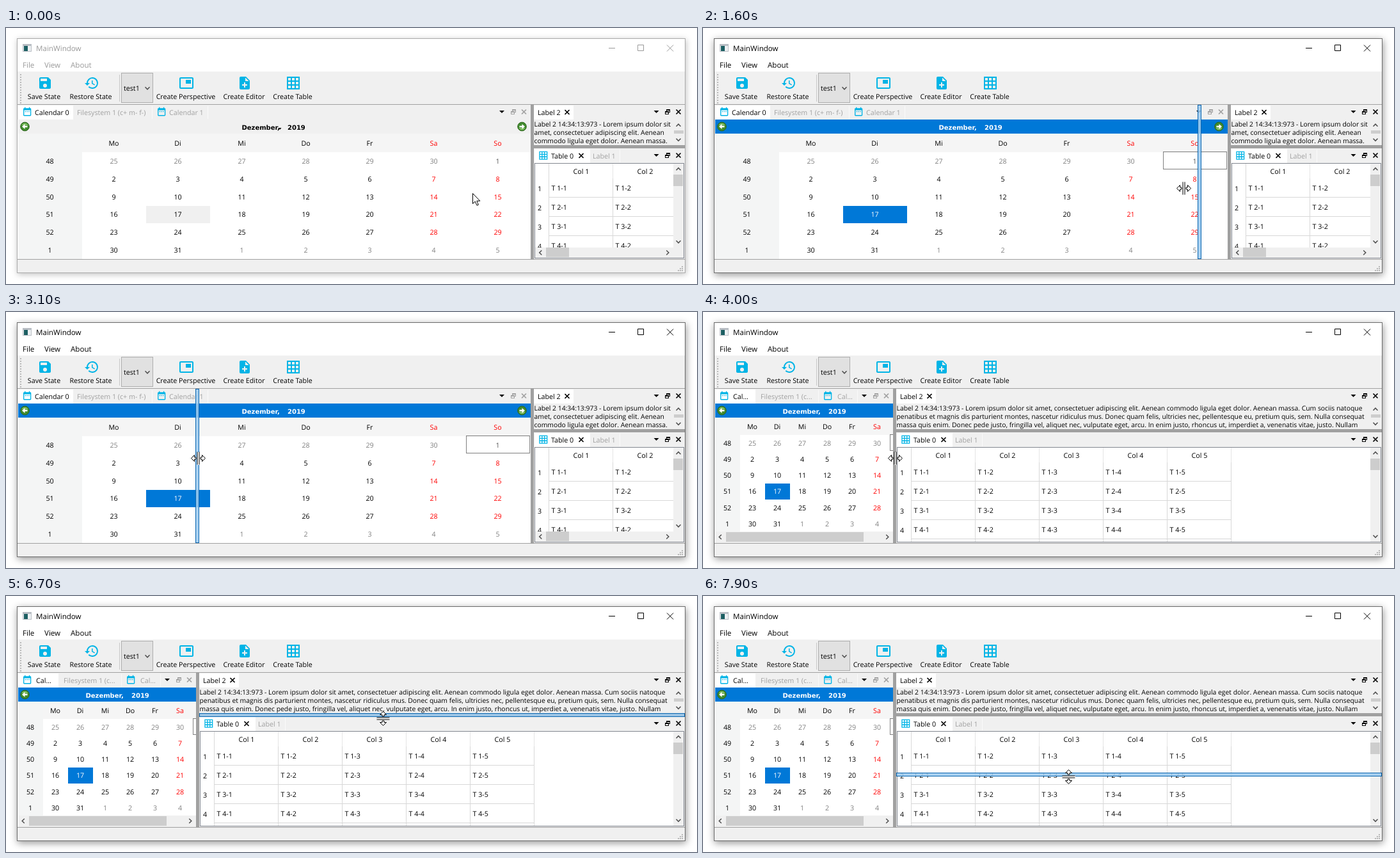
Animation, 1080 px wide and 400 px high, one loop 8000 ms. Source, as an HTML page:

```html
<!DOCTYPE html>
<html lang="en">
<head>
<meta charset="utf-8">
<title>MainWindow</title>
<style>
html, body { margin: 0; width: 100%; height: 100%; overflow: hidden; background: #fff; }
svg { display: block; }
#stage {
  --sel: #0078d7; --selText: #fff; --ui: #000; --edge: #6b6b6b;
  --shadow: drop-shadow(1px 3px 6px rgba(0,0,0,.42));
}
#stage.off {
  --sel: #f0f0f0; --selText: #000; --ui: #999; --edge: #aaa;
  --shadow: drop-shadow(1px 2px 5px rgba(0,0,0,.25));
}
text { font: 10.7px "Open Sans", "Noto Sans", sans-serif; text-rendering: geometricPrecision; white-space: pre; }
.ui { font-size: 11.6px; fill: var(--ui); }
.body { font-size: 10.36px; }
.bold { font: bold 10px "DejaVu Sans", sans-serif; fill: var(--selText); }
.mid { text-anchor: middle; }
.dim { fill: #a0a0a0; }
rect, .crisp { shape-rendering: crispEdges; }
.frame { filter: var(--shadow); }
.line { fill: none; stroke: #505050; stroke-width: 1.5; }
.icon { fill: #00b4e6; }
.grid { fill: none; stroke: #00b4e6; stroke-width: 2; }
.focus { fill: none; stroke: #000; stroke-dasharray: 1 1; shape-rendering: auto; }
.off .focus, #stage:not(.off) .hint { display: none; }
.bar { fill: #9ccbef; fill-opacity: .88; stroke: #0b66b0; }
.cursor { fill: #fff; stroke: #000; }
</style>
</head>
<body>
<svg id="stage" width="1080" height="400" viewBox="0 0 1080 400"></svg>
<script>
const rect = (x, y, w, h, fill, more = '') =>
  `<rect x="${x}" y="${y}" width="${w}" height="${h}" fill="${fill}" ${more}/>`;
const text = (x, y, s, cls = '', fill = '') =>
  `<text x="${x}" y="${Math.round(y)}" class="${cls}" ${fill && `style="fill:${fill}"`}>${s}</text>`;
const path = (d, attrs) => `<path d="${d}" ${attrs}/>`;
const at = (x, y, body, more = '') => `<g transform="translate(${x} ${y}) ${more}">${body}</g>`;
const clip = (x, y, w, h, body) =>
  `<svg x="${x}" y="${y}" width="${w}" height="${h}" viewBox="${x} ${y} ${w} ${h}">${body}</svg>`;
const range = (n, fn) => Array.from({ length: n }, (_, i) => fn(i)).join('');

const GREY = '#a0a0a0', PANEL = '#f0f0f0', LINE = '#d8d8d8', THUMB = '#cdcdcd';

const glyph = {
  save: 'M17 3H5c-1.1 0-2 .9-2 2v14c0 1.1.9 2 2 2h14c1.1 0 2-.9 2-2V7zm-5 16a3 3 0 1 1 0-6a3 3 0 1 1 0 6zm3-10H5V5h10z',
  restore: 'M13 3a9 9 0 0 0-9 9H1l4 4 4-4H6a7 7 0 1 1 2 5l-1.4 1.4A9 9 0 1 0 13 3zm-1 5v5l4.3 2.5.7-1.2-3.5-2V8z',
  perspective: 'M19 7h-8v6h8zm2-4H3c-1.1 0-2 .9-2 2v14c0 1.1.9 2 2 2h18c1.1 0 2-.9 2-2V5c0-1.1-.9-2-2-2zm0 16H3V5h18z',
  editor: 'M14 2H6c-1.1 0-2 .9-2 2v16c0 1.1.9 2 2 2h12c1.1 0 2-.9 2-2V8zm2 14h-3v3h-2v-3H8v-2h3v-3h2v3h3zm-3-7V3.5L18.5 9z',
  calendar: 'M19 4h-1V2h-2v2H8V2H6v2H5c-1.1 0-2 .9-2 2v14c0 1.1.9 2 2 2h14c1.1 0 2-.9 2-2V6c0-1.1-.9-2-2-2zm0 16H5V9h14zM7 11h2v2H7zm4 0h2v2h-2zm4 0h2v2h-2z'
};
const icon = (name, x, y, scale = 1) =>
  at(x, y, path(glyph[name], 'class="icon" fill-rule="evenodd"'), `scale(${scale})`);
const gridIcon = (x, y, scale = 1) => at(x, y,
  path([3, 9, 15, 21].map(p => `M${p} 2v20M2 ${p}h20`).join(''), 'class="grid"'), `scale(${scale})`);

const chevron = (x, y, turn = 0) =>
  at(x, y, path('M-3.5 -1.8L0 1.8L3.5 -1.8', 'class="line"'), `rotate(${turn})`);
const cross = (x, y, color = '#000') =>
  at(x, y, path('M-3.5 -3.5l7 7m0 -7l-7 7', `stroke="${color}" stroke-width="1.7"`));

function dockButtons(x, y, color) {
  return path(`M${x - 4} ${y - 2}h8l-4 4z`, '') +
    at(Math.round(x + 17.5), y, path('M-3.5 -.5h5v4h-5zM-1.5 -.5v-3h5v4h-2M-3.5 .5h5M-1.5 -2.5h5',
      `fill="none" stroke="${color}" class="crisp"`)) +
    cross(x + 34.5, y, color);
}

function roundArrow(x, turn) {
  return at(x, 154,
    '<circle r="6.8" fill="#3f8a2c" stroke="#2c641d"/><path d="M-5 -2a5.4 5.4 0 0 1 10 0z" fill="#7fbd62"/>' +
    path('M4 -1.2H0V-4L-4.5 0L0 4V1.2H4z', 'fill="#fff"'), `rotate(${turn})`);
}

function calendar(wide) {
  const right = wide ? 820 : 297, bottom = wide ? 361 : 343;
  const w = wide ? 100 : 39, h = wide ? 27.8 : 25.3, top = wide ? 166.4 : 166.8;
  const x0 = 19, mid = x0 + w * 4 - .5;
  const cx = c => x0 + w * (c + .5) - .5, cy = r => top + h * (r + .5) + 3.8;
  let s = rect(19, 143, right - 19, 218, '#fff') +
    rect(19, 165, right - 19, h + top - 165, '#f5f5f5') + rect(19, 165, w, bottom - 165, '#f4f5f5') +
    rect(19, 143, right - 19, 22, 'var(--sel)') +
    text(mid - 50, 159, 'Dezember,', 'bold') + text(mid + 21.5, 159, '2019', 'bold') +
    path(`M${mid + 7} 156h5l-2.5 3z`, 'class="hint"') +
    roundArrow(29.5, 0) + (wide ? roundArrow(806.5, 180) : '');
  ['Mo', 'Di', 'Mi', 'Do', 'Fr', 'Sa', 'So'].forEach((d, c) => {
    s += text(cx(c + 1), cy(0), d, 'mid', c > 4 ? '#f00' : '#000');
  });
  s += rect(x0 + w * 2, top + h * 4, w, h, 'var(--sel)');
  for (let r = 0; r < 6; r++) {
    s += text(cx(0), cy(r + 1), r < 5 ? 48 + r : 1, 'mid');
    for (let c = 0; c < 7; c++) {
      const n = r * 7 + c - 5, inside = n > 0 && n < 32;
      const day = n < 1 ? n + 30 : inside ? n : n - 31;
      const color = n === 17 ? 'var(--selText)' : n === 1 ? '#555' : !inside ? '#808080' : c > 4 ? '#f00' : '#000';
      s += text(cx(c + 1), cy(r + 1), day, 'mid', color);
    }
  }
  s += `<rect class="focus" x="${x0 + w * 7 + .5}" y="${Math.floor(top + h) - .5}" width="${w - 1}" height="${Math.floor(h)}"/>`;
  s = clip(19, 143, right - 19, bottom - 143, s);
  if (!wide) s += rect(19, 343, 278, 18, PANEL) + rect(36, 344, 215, 15, THUMB) +
    chevron(27, 351.5, 90) + chevron(288, 351.5, -90);
  return s;
}

function leftDock(wide) {
  const right = wide ? 820 : 297, ends = wide ? [105, 228, 315] : [82, 180, 241];
  const name = n => wide ? 'Calendar ' + n : 'Cal...';
  return rect(18, 120, right - 18, 23, PANEL) + rect(19, 121, ends[0] - 19, 22, '#fff') +
    rect(ends[1], 122, 1, 20, '#fafafa') + rect(ends[2], 122, 1, 20, '#fafafa') +
    icon('calendar', 25, 122.5, .68) + text(wide ? 45 : 47, 135.5, name(0)) +
    text(wide ? 111 : 90, 135.5, wide ? 'Filesystem 1 (c+ m- f-)' : 'Filesystem 1 (c...', 'dim') +
    icon('calendar', ends[1] + 7, 122.5, .68) + text(ends[1] + (wide ? 27 : 30), 135.5, name(1), 'dim') +
    dockButtons(wide ? 775 : 252, 131, GREY) + calendar(wide);
}

const lorem = {
  narrow: ['Label 2 14:34:13:973 - Lorem ipsum dolor sit', 'amet, consectetuer adipiscing elit. Aenean',
    'commodo ligula eget dolor. Aenean massa.'],
  broad: ['Label 2 14:34:13:973 - Lorem ipsum dolor sit amet, consectetuer adipiscing elit. Aenean commodo ligula eget dolor. Aenean massa. Cum sociis natoque',
    'penatibus et magnis dis parturient montes, nascetur ridiculus mus. Donec quam felis, ultricies nec, pellentesque eu, pretium quis, sem. Nulla consequat',
    'massa quis enim. Donec pede justo, fringilla vel, aliquet nec, vulputate eget, arcu. In enim justo, rhoncus ut, imperdiet a, venenatis vitae, justo. Nullam']
};

function table(x, cols, bottom) {
  const x0 = x + 23, right = Math.min(1043, x0 + cols * 100 + 1);
  let s = cols > 2 ? rect(0, 212, 100, 23, '#d9ebf9', 'id="hover"') : '';
  for (let c = 0; c < cols; c++) {
    s += text(x0 + c * 100 + 51, 228, 'Col ' + (c + 1), 'mid') +
      rect(x0 + (c + 1) * 100, 212, 1, 23, '#e5e5e5') + rect(x0 + (c + 1) * 100, 235, 1, 130, LINE);
    for (let r = 0; r < 4; r++) s += text(x0 + c * 100 + 4.5, 254 + r * 30, `T ${r + 1}-${c + 1}`);
  }
  s += rect(x0, 212, 1, 150, LINE) +
    range(4, r => text(x + 9, 254.5 + r * 30, r + 1, 'mid') + rect(x0, 264 + r * 30, right - x0, 1, LINE));
  return clip(x + 2, 212, 1041 - x, bottom - 212, s);
}

function rightDock(x, wide) {
  const bottom = wide ? 343 : 359, w = 1061 - x;
  let s = rect(x, 120, w, 63, PANEL) + rect(x, 121, 62, 22, '#fff') +
    text(x + 6, 135.5, 'Label 2') + cross(x + 52, 131.5) + dockButtons(1016.5, 131, '#000') +
    clip(x, 143, 1043 - x, 40, (wide ? lorem.narrow : lorem.broad)
      .map((l, i) => text(x + .5, 154 + i * 13, l, 'body')).join('')) +
    chevron(1051, 152, 180) + rect(1044, 160, 15, 5, THUMB) + chevron(1051, 174.5) +
    rect(x, 183, w, 5, GREY) +
    rect(x, 188, w, 173, PANEL) + rect(x + 1, 189, 87, 22, '#fff') +
    gridIcon(x + 7, 191.5, .65) + text(x + 27, 203.5, 'Table 0') + cross(x + 74, 199.5) +
    text(x + 92, 203.5, 'Label 1', 'dim') + rect(x + 134, 190, 1, 20, '#fafafa') +
    dockButtons(1016.5, 199, '#000') +
    rect(x + 1.5, 211.5, 1058 - x, 148, '#fff', 'stroke="#828790"') +
    table(x, wide ? 2 : 5, bottom) +
    rect(1043, 212, 16, 147, PANEL) + chevron(1051, 220.5, 180) + rect(1043, 229, 15, 18, THUMB) +
    chevron(1051, wide ? 334 : 350.5);
  if (wide) s += rect(827, 343, 232, 16, PANEL) + rect(844, 343, 36, 15, THUMB) +
    chevron(835.5, 351, 90) + chevron(1034, 351, -90);
  return s;
}

const layout = (id, wide) => {
  const edge = wide ? 820 : 297, x = wide ? 825 : 302;
  return `<g id="${id}">${leftDock(wide)}${rect(edge, 120, 5, 241, GREY)}${rightDock(x, wide)}</g>`;
};

const shell = rect(17, 16, 1045, 367, '#fff', 'class="frame"') +
  rect(18, 68, 1043, 51, PANEL) + rect(18, 119, 1043, 1, GREY) +
  rect(26, 25, 14, 12, '#b9bec4') + rect(27, 28, 12, 8, '#eef1f3') + rect(28, 28, 6, 8, '#1d5f63') +
  text(47, 36, 'MainWindow', 'ui') +
  `<g fill="none" style="stroke:var(--ui)">${path('M942 31.5h10M987.5 26.5h9v9h-9zM1033 26.5l10 10m0 -10l-10 10', '')}</g>` +
  text(26, 62, 'File', 'ui') + text(60, 62, 'View', 'ui') + text(101, 62, 'About', 'ui') +
  range(12, i => rect(22, 72 + i * 4, 2, 2, '#b8b8b8')) +
  icon('save', 49, 74) + icon('restore', 122, 74) + icon('perspective', 270, 74) + icon('editor', 361, 74) + gridIcon(437, 74) +
  [[59.5, 'Save State'], [132.5, 'Restore State'], [281, 'Create Perspective'], [372, 'Create Editor'], [448, 'Create Table']]
    .map(([x, s]) => text(x, 111, s, 'mid')).join('') +
  rect(177, 73, 1, 42, '#c8c8c8') + rect(180.5, 70.5, 49, 46, '#e1e1e1', 'stroke="#adadad"') +
  text(184, 98, 'test1') + chevron(221, 94) +
  rect(18, 361, 1043, 21, PANEL);

const grip = range(3, i => range(i + 1, j => rect(1056 - j * 3, 372 + i * 3, 2, 2, '#b8b8b8')));
const half = 'M3.5 -1.5H6V-5L11 0L6 5V1.5H3.5z';

const stage = document.getElementById('stage');
stage.innerHTML = shell + layout('wide', true) + layout('narrow', false) +
  rect(18, 361, 1043, 1, GREY) + grip +
  rect(17.5, 16.5, 1044, 366, 'none', 'style="stroke:var(--edge)"') +
  '<rect id="vbar" class="bar" y="120.5" width="5" height="240"/>' +
  '<rect id="hbar" class="bar" x="302.5" width="758" height="5"/>' +
  `<g id="arrow" class="cursor">${path('M.5 .5V16.5L4.2 13L7 19.2L9.4 18.2L6.8 12.2H11.8Z', '')}</g>` +
  `<g id="split" class="cursor">${rect(-1.5, -10, 3, 20, '#fff', 'stroke="none"')}${path('M-1.5 -10V10M1.5 -10V10', '')}${path(half, '')}${path(half, 'transform="scale(-1 1)"')}</g>`;

const [wide, narrow, vbar, hbar, arrow, split, hover] =
  ['wide', 'narrow', 'vbar', 'hbar', 'arrow', 'split', 'hover'].map(id => document.getElementById(id));

// Tables of time, x, y
const pointer = [
  [200, 729, 258], [300, 736, 260], [500, 765, 260], [700, 803, 257], [900, 824, 255],
  [1300, 824, 255], [1400, 806, 254], [1600, 751, 250], [1800, 690, 247], [2100, 577, 242],
  [2400, 438, 236], [2500, 415, 235], [2800, 322, 230], [3000, 300, 228],
  [4600, 300, 228], [4700, 318, 231], [4900, 428, 231], [5200, 552, 214], [5500, 574, 199],
  [6000, 588, 186], [6600, 589, 186], [6800, 588, 196], [7000, 583, 218], [7200, 577, 241],
  [7500, 574, 260], [7900, 571, 282]
];
const vTrack = [
  [1300, 823], [1400, 818], [1500, 800], [1600, 776], [1800, 722], [2100, 620],
  [2400, 484], [2500, 438], [2600, 415], [2900, 322], [3000, 303], [3100, 299]
];
const hTrack = [[6700, 186], [6800, 190], [7000, 208], [7200, 233], [7500, 255], [7900, 279]];

function sample(keys, t, axis) {
  const i = keys.findIndex(k => k[0] >= t);
  if (i < 0) return keys[keys.length - 1][axis];
  if (i === 0) return keys[0][axis];
  const a = keys[i - 1], b = keys[i];
  return Math.round(a[axis] + (b[axis] - a[axis]) * (t - a[0]) / (b[0] - a[0]));
}
const show = (el, on) => el.setAttribute('visibility', on ? 'visible' : 'hidden');

function draw(now) {
  const t = Math.floor(now % 8000 / 100) * 100;
  const x = sample(pointer, t, 1), y = sample(pointer, t, 2);
  const sideways = t >= 900 && t < 4700, resizing = sideways || t >= 6300;
  stage.classList.toggle('off', t < 1300);
  wide.style.display = t < 4000 ? '' : 'none';
  narrow.style.display = t < 4000 ? 'none' : '';
  show(vbar, t >= 1300 && t < 4000);
  vbar.setAttribute('x', sample(vTrack, t, 1) - 2.5);
  show(hbar, t >= 6700);
  hbar.setAttribute('y', sample(hTrack, t, 1) - 2.5);
  show(arrow, !resizing);
  show(split, resizing);
  arrow.setAttribute('transform', `translate(${x} ${y})`);
  split.setAttribute('transform', `translate(${x + .5} ${y + .5}) rotate(${sideways ? 0 : 90})`);
  const col = Math.floor((x - 325) / 100);
  show(hover, t >= 4700 && !resizing && y >= 212 && y < 235 && col >= 0);
  hover.setAttribute('x', 326 + col * 100);
}

const start = performance.now();
function tick() {
  draw(performance.now() - start);
  requestAnimationFrame(tick);
}
tick();
</script>
</body>
</html>
```
